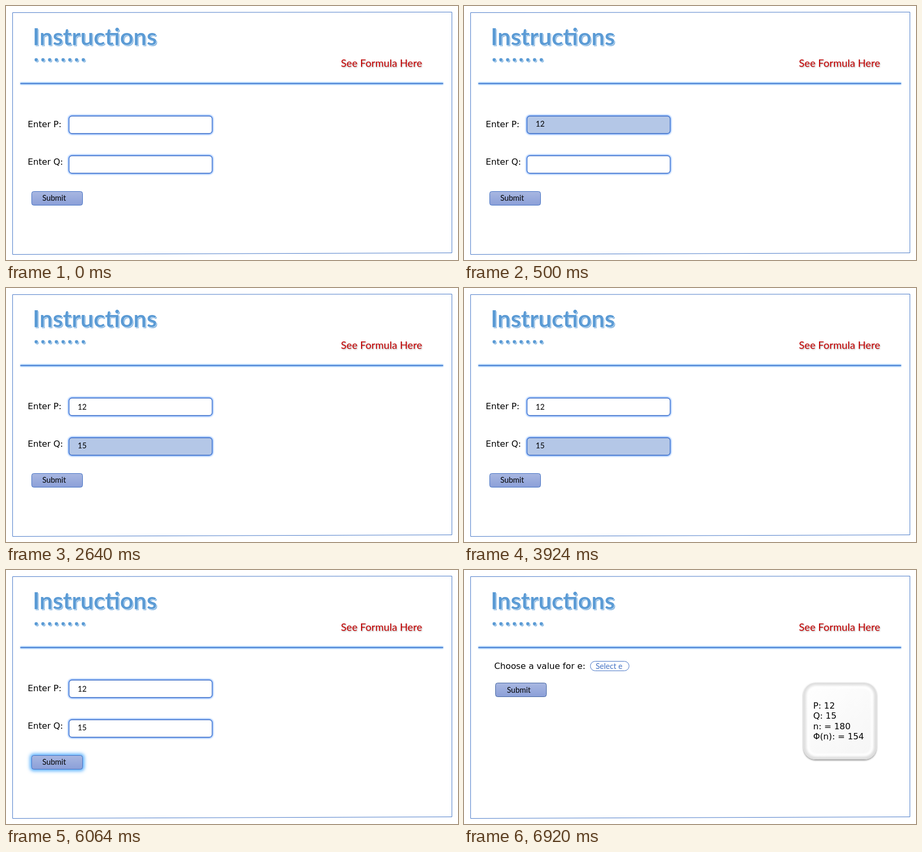
Animation, 853 px wide and 480 px high, one loop 8 s. Source, as an HTML page:

```html
<!DOCTYPE html>
<html lang="en">
<head>
<meta charset="utf-8">
<title>Instructions</title>
<style>
html, body { margin: 0; width: 100%; height: 100%; overflow: hidden; background: #fff; }
svg { display: block; width: 100vw; height: 100vh; }
text { font: 16.2px "DejaVu Sans", sans-serif; white-space: pre; }
.ui { font: 14.6px Lato, sans-serif; }
.title { font: bold 44.2px Lato, sans-serif; }
.link { font: 19.4px Lato, sans-serif; letter-spacing: .1px; }
.box { fill: #fff; stroke: #3f6fc6; stroke-width: 1.3; }
.on { fill: #b4c7e7; }
</style>
</head>
<body>
<svg viewBox="0 0 853 480">
  <defs>
    <linearGradient id="btn" x2="0" y2="1">
      <stop stop-color="#a8b7e1"/><stop offset="1" stop-color="#8b9fd8"/>
    </linearGradient>
    <linearGradient id="face" x2=".8" y2="1">
      <stop stop-color="#fff"/><stop offset="1" stop-color="#f6f6f6"/>
    </linearGradient>
    <filter id="blur" x="-30%" y="-60%" width="160%" height="220%"><feGaussianBlur stdDeviation="1.5"/></filter>
    <filter id="wide" x="-30%" y="-60%" width="160%" height="220%"><feGaussianBlur stdDeviation="3.2"/></filter>
    <filter id="cast" x="-20%" y="-20%" width="140%" height="140%">
      <feDropShadow dx="0" dy="1.5" stdDeviation="1.5" flood-color="#000" flood-opacity=".5"/>
    </filter>
    <filter id="soft"><feDropShadow dx="1" dy="1.2" stdDeviation=".8" flood-color="#000" flood-opacity=".35"/></filter>
    <clipPath id="cardClip"><rect x="640.5" y="213" width="138" height="145" rx="23"/></clipPath>
    <g id="heading">
      <text class="title" x="50.5" y="74">Instructions</text>
      <g id="dots"></g>
    </g>
  </defs>

  <path d="M12.5 12.5L841.5 11.5V466.5L12.5 469.5Z" fill="none" stroke="#4a7ac8"/>
  <use href="#heading" x="1.7" y="1.7" fill="#7fb2e0"/>
  <use href="#heading" fill="#5b9bd5" stroke="#fff" stroke-width="1.4" paint-order="stroke"/>
  <text class="link" x="632" y="115" fill="#c00000" filter="url(#soft)">See Formula Here</text>
  <path d="M27 146.5H825" stroke="#58a6f5" stroke-width="4" opacity=".8" filter="url(#lineBlur)" id="lineGlow"/>
  <path d="M27 146.5H825" stroke="#3f6fc6" stroke-width="1.3"/>
  <filter id="lineBlur" filterUnits="userSpaceOnUse" x="15" y="135" width="823" height="23">
    <feGaussianBlur stdDeviation="1.2"/>
  </filter>

  <g id="form">
    <text x="41" y="229">Enter P:</text>
    <text x="41" y="300">Enter Q:</text>
    <g fill="none" stroke="#5b9bff" stroke-width="3.5" filter="url(#blur)">
      <rect x="119" y="208" width="270" height="33" rx="5.5"/>
      <rect x="119" y="283" width="270" height="33" rx="5.5"/>
    </g>
    <rect id="boxP" class="box" x="119" y="208" width="270" height="33" rx="5.5"/>
    <rect id="boxQ" class="box" x="119" y="283" width="270" height="33" rx="5.5"/>
    <text id="valP" class="ui" x="135.3" y="230">12</text>
    <text id="valQ" class="ui" x="135.3" y="303">15</text>
    <rect id="glow" x="45" y="347" width="103" height="33" rx="7" fill="#58b0ff" filter="url(#wide)"/>
    <rect x="48.5" y="350.5" width="96" height="26" rx="4" fill="url(#btn)" stroke="#4472c4"/>
    <text class="ui" x="68.5" y="368">Submit</text>
  </g>

  <g id="result">
    <text x="57" y="187">Choose a value for e:</text>
    <rect x="238.5" y="172.5" width="73" height="18" rx="9" fill="#fff" stroke="#4472c4"/>
    <text class="ui" x="248.5" y="187" fill="#4472c4">Select e</text>
    <rect x="59.5" y="213.5" width="96" height="26" rx="4" fill="url(#btn)" stroke="#41639f"/>
    <text class="ui" x="81" y="232">Submit</text>
    <rect x="640.5" y="213" width="138" height="145" rx="23" fill="url(#face)" filter="url(#cast)"/>
    <g clip-path="url(#cardClip)">
      <rect x="640.5" y="213" width="138" height="145" rx="23" fill="none" stroke="#d8d8d8" stroke-width="9" filter="url(#wide)"/>
      <rect x="650" y="222" width="120" height="127" rx="15" fill="none" stroke="#fff" stroke-width="4" filter="url(#blur)"/>
    </g>
    <text x="659" y="262">P: 12</text>
    <text x="659" y="281">Q: 15</text>
    <text x="659" y="301">n: = 180</text>
    <text x="659" y="320">Φ(n): = 154</text>
  </g>
</svg>
<script>
const $ = id => document.getElementById(id);
const show = (id, on) => $(id).style.display = on ? "" : "none";
const starts = [500, 2640, 4780, 6920];

for (let i = 0; i < 8; i++)
  $("dots").innerHTML += `<circle cx="${57 + 12.7 * i}" cy="101.7" r="3.1"/>`;

function draw(now) {
  const t = now % 8000;
  const step = starts.filter(s => t >= s).length;
  show("form", step < 4);
  show("result", step === 4);
  show("valP", step > 0);
  show("valQ", step > 1);
  show("glow", step === 3);
  $("boxP").classList.toggle("on", step === 1);
  $("boxQ").classList.toggle("on", step === 2);
  $("valP").setAttribute("y", step === 1 ? 228 : 230);
  requestAnimationFrame(draw);
}
draw(performance.now());
</script>
</body>
</html>
```
